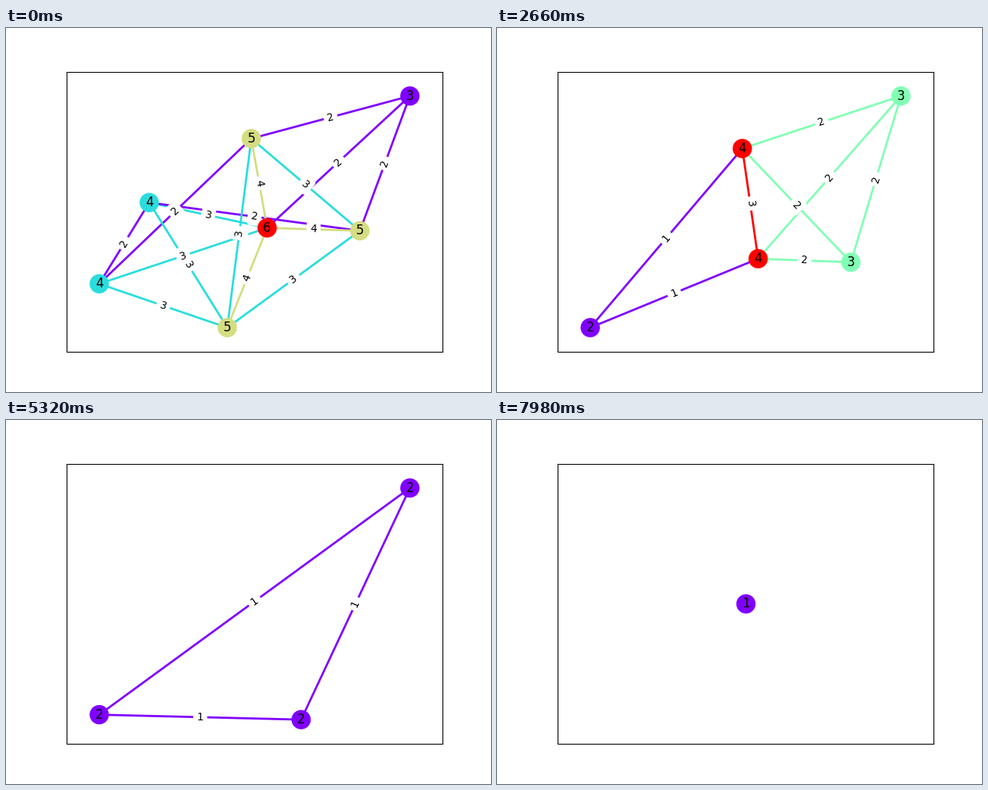
These frames come from a looping animation (640x480 px, 9.31 s). A matplotlib script:

```python
import math
from itertools import combinations

import matplotlib.pyplot as plt
from matplotlib.animation import FuncAnimation

# Node layout in stage pixels, y pointing down.
LAYOUT = {
    "A": (123.04, 337.3), "B": (189.0, 230.2), "C": (323.7, 145.8),
    "D": (532.96, 89.67), "E": (344.6, 263.6), "F": (467.0, 267.4),
    "G": (292.0, 395.12),
}
EDGES = "AB AC AE AG BE BF BG CD CE CF CG DE DF EF EG FG".split()
REMOVAL = "BGACEF"  # one node is peeled off per step
LEFT, RIGHT, TOP, BOTTOM = 80, 576, 57.6, 427.2
FILL = 1 / 1.21  # share of the axes spanned by the graph


def rescale(values, low, high):
    """Spread values over the padded range, or centre a single one."""
    mid, half = (low + high) / 2, (high - low) / 2 * FILL
    vmin, vmax = min(values), max(values)
    if vmin == vmax:
        return [mid] * len(values)
    return [mid - half + 2 * half * (v - vmin) / (vmax - vmin) for v in values]


def text_angle(p, q):
    angle = math.degrees(math.atan2(p[1] - q[1], q[0] - p[0]))
    if angle > 90:
        angle -= 180
    elif angle < -90:
        angle += 180
    return angle


fig = plt.figure(figsize=(6.4, 4.8), dpi=100, facecolor="white")
ax = fig.add_axes([0.125, 0.11, 0.775, 0.77])
plt.rcParams["font.family"] = "DejaVu Sans"


def draw(step):
    ax.clear()
    ax.set(xlim=(LEFT, RIGHT), ylim=(BOTTOM, TOP), xticks=[], yticks=[])

    nodes = [n for n in LAYOUT if n not in REMOVAL[:step]]
    xs = rescale([LAYOUT[n][0] for n in nodes], LEFT, RIGHT)
    ys = rescale([LAYOUT[n][1] for n in nodes], TOP, BOTTOM)
    pos = dict(zip(nodes, zip(xs, ys)))

    edges = [a + b for a, b in combinations(nodes, 2) if a + b in EDGES]
    near = {n: {m for e in edges if n in e for m in e if m != n} for n in nodes}
    degree = {n: max(1, len(near[n])) for n in nodes}
    low, high = min(degree.values()), max(degree.values())

    def shade(value):
        return plt.cm.rainbow((value - low) / max(1, high - low))

    for a, b in edges:
        p, q = pos[a], pos[b]
        shared = len(near[a] & near[b])
        ax.plot([p[0], q[0]], [p[1], q[1]], color=shade(shared + 1), lw=2,
                solid_capstyle="butt", zorder=1)
        ax.text((p[0] + q[0]) / 2, (p[1] + q[1]) / 2, str(shared),
                size=10, ha="center", va="center", rotation=text_angle(p, q),
                bbox=dict(boxstyle="round", ec="white", fc="white"),
                zorder=1.5)

    ax.scatter(xs, ys, s=300, c=[shade(degree[n]) for n in nodes],
               linewidths=1, zorder=2)
    for n in nodes:
        ax.text(*pos[n], str(degree[n]), size=12, ha="center", va="center",
                zorder=3)
    return []


anim = FuncAnimation(fig, draw, frames=len(LAYOUT), interval=1330,
                     repeat=True, repeat_delay=0, blit=False)
plt.show()
```
